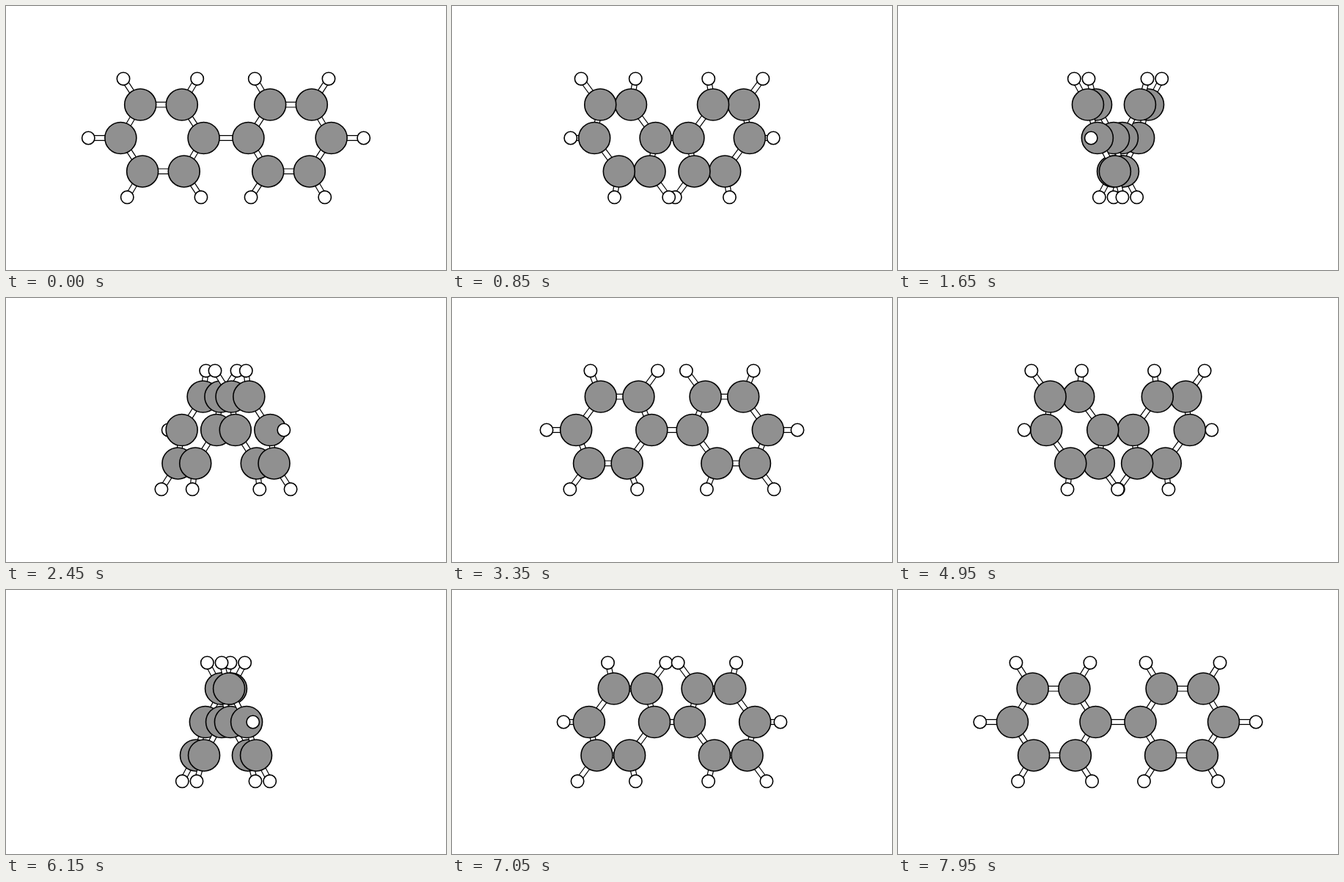
Animation of 600x360 px, one loop 8000 ms. Source, as an HTML page with a canvas:

```html
<!DOCTYPE html>
<html lang="en">
<head>
<meta charset="utf-8">
<title>Rotating molecule</title>
<style>
  html, body { margin: 0; width: 100%; height: 100%; overflow: hidden; background: #fff; }
  canvas { display: block; width: 600px; height: 360px; }
</style>
</head>
<body>
<canvas id="stage" width="600" height="360"></canvas>
<script>
const ctx = document.getElementById('stage').getContext('2d');
const STEP_MS = 50, STEPS = 160, START_STEP = 2;
const RING_X = 87.3, CARBON_R = 56.8, HYDROGEN_R = 101;
const TILT = Math.PI / 8;
const CARBON = { size: 21.5, fill: '#909090' };
const HYDROGEN = { size: 8.7, fill: '#fff' };

const atoms = [], bonds = [];

// A spot on a ring, its plane tilted about the long axis.
function addAtom(side, corner, radius, kind) {
  const angle = corner * Math.PI / 3;
  const up = radius * Math.sin(angle);
  const atom = {
    x: side * (RING_X + radius * Math.cos(angle)),
    y: -up * Math.cos(TILT),
    z: side * up * Math.sin(TILT),
    ...kind
  };
  atoms.push(atom);
  return atom;
}

function addRing(side) {
  const ring = [];
  for (let i = 0; i < 6; i++) {
    ring.push(addAtom(side, i, CARBON_R, CARBON));
    if (i !== 3) bonds.push([ring[i], addAtom(side, i, HYDROGEN_R, HYDROGEN)]);
  }
  ring.forEach((c, i) => bonds.push([c, ring[(i + 1) % 6]]));
  return ring[3];
}

bonds.push([addRing(1), addRing(-1)]);

function line(a, b, width, color) {
  ctx.beginPath();
  ctx.moveTo(a.px, a.py);
  ctx.lineTo(b.px, b.py);
  ctx.lineWidth = width;
  ctx.strokeStyle = color;
  ctx.stroke();
}

function drawBond([a, b]) {
  line(a, b, 8.1, '#000');
  line(a, b, 5.7, '#fff');
}

function drawAtom(a) {
  ctx.beginPath();
  ctx.arc(a.px, a.py, a.size, 0, 2 * Math.PI);
  ctx.fillStyle = a.fill;
  ctx.fill();
  ctx.lineWidth = 1.6;
  ctx.strokeStyle = '#000';
  ctx.stroke();
}

function draw(step) {
  const turn = (step + START_STEP) / STEPS * 2 * Math.PI;
  const cos = Math.cos(turn), sin = Math.sin(turn);
  for (const a of atoms) {
    a.px = 300 + a.x * cos + a.z * sin;
    a.py = 180 + a.y;
    a.depth = a.z * cos - a.x * sin;
  }
  // Each bond sits just behind its farther atom.
  const parts = [
    ...bonds.map(b => ({ depth: Math.min(b[0].depth, b[1].depth) - 0.01, paint: () => drawBond(b) })),
    ...atoms.map(a => ({ depth: a.depth, paint: () => drawAtom(a) }))
  ];
  parts.sort((p, q) => p.depth - q.depth);
  ctx.fillStyle = '#fff';
  ctx.fillRect(0, 0, 600, 360);
  parts.forEach(p => p.paint());
}

const start = performance.now();
function tick() {
  const elapsed = Math.max(0, performance.now() - start);
  draw(Math.floor(elapsed / STEP_MS) % STEPS);
  requestAnimationFrame(tick);
}
tick();
</script>
</body>
</html>
```
